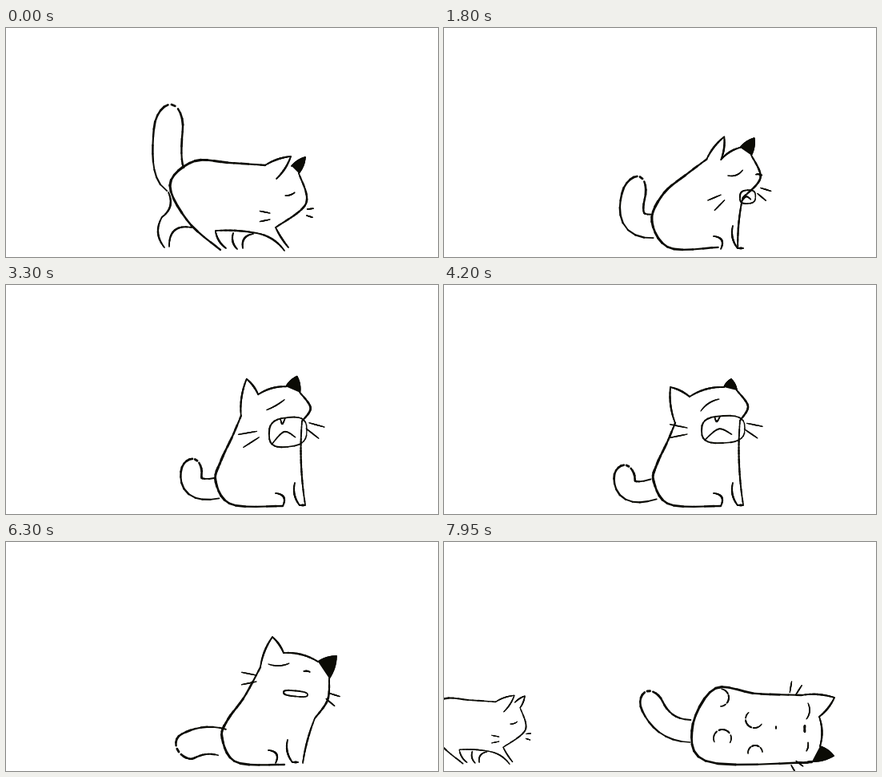
Animation of 540 by 287 pixels, one loop 8 s. Source, as an HTML page with a canvas:

```html
<!DOCTYPE html>
<html lang="en">
<head>
<meta charset="utf-8">
<title>Sleepy cat</title>
<style>
html, body { margin: 0; width: 100%; height: 100%; overflow: hidden; background: #fff; }
canvas { display: block; }
</style>
</head>
<body>
<canvas id="stage" width="540" height="287"></canvas>
<script>
const ctx = document.getElementById('stage').getContext('2d');
const LOOP = 8000, STEP = 150, N = 28;

// A pose is a set of joints; the rig below turns any blend of poses into lines.
// tail: root, bend, tip, radius; ears: base, tip, base; eye: ends, bend;
// mouth: centre, radii, tilt; whiskers: root, angle, length; mode: walking, lying, height
const walk = {
  tail: [211, 189, 194, 178, 207, 96, 18], back: [280, 169, 235, 167], seat: [205, 196, 228, 243, 268, 278],
  earL: [324, 172, 356, 161, 338, 189], earR: [357, 173, 374, 162, 366, 182],
  face: [375, 220, 337, 250], foot: [353, 275], eye: [349, 210, 361, 206, 0.1],
  mouth: [372, 234, 0, 0, 0], left: [330, 236, 3.14, 13], right: [376, 231, 0.1, 8],
  paw: [0], mode: [1, 0, 1]
};
const crouch = {
  tail: [258, 244, 216, 243, 249, 164, 16], back: [318, 181, 278, 199], seat: [258, 238, 282, 276, 340, 273],
  earL: [354, 168, 383, 155, 368, 188], earR: [386, 168, 405, 158, 397, 178],
  face: [407, 214, 376, 246], foot: [362, 277], eye: [376, 208, 392, 205, 0.2],
  mouth: [400, 232, 0, 0, 0], left: [371, 231, 2.5, 13], right: [407, 226, 0.5, 9],
  paw: [0], mode: [0, 0, 1]
};
const sit = { ...crouch, seat: [262, 246, 282, 275, 346, 277], foot: [374, 275] };
const yawn = {
  ...sit, tail: [265, 254, 220, 260, 240, 215, 13], back: [285, 186, 270, 218],
  earL: [296, 160, 309, 113, 319, 136], earR: [350, 127, 366, 113, 368, 136],
  face: [381, 155, 370, 171], eye: [328, 156, 350, 144, 0.1],
  mouth: [354, 186, 22, 19, -0.12], left: [320, 189, 2.6, 24], right: [377, 176, 0.5, 20]
};
const wail = {
  ...sit, tail: [262, 256, 216, 270, 228, 226, 13], back: [279, 197, 266, 225],
  earL: [289, 173, 283, 128, 307, 140], earR: [350, 128, 359, 118, 366, 132],
  face: [380, 152, 370, 170], eye: [321, 158, 344, 143, -0.1],
  mouth: [349, 181, 27, 17, -0.05], left: [304, 183, 3.14, 22], right: [377, 177, 0.4, 20]
};
const sulk = {
  ...sit, tail: [261, 255, 216, 264, 223, 236, 14], back: [284, 192, 268, 225],
  earL: [297, 172, 300, 125, 321, 143], earR: [366, 142, 387, 130, 381, 154],
  face: [393, 180, 378, 212], eye: [320, 167, 347, 156, 0],
  mouth: [358, 193, 28, 7, -0.1], left: [299, 191, 3.14, 21], right: [391, 190, 0, 13]
};
const doze = {
  ...sit, tail: [270, 251, 243, 243, 216, 263, 17], back: [298, 194, 277, 223],
  seat: [270, 245, 288, 276, 348, 279], foot: [371, 277], paw: [-9],
  earL: [318, 157, 333, 119, 347, 139], earR: [390, 150, 413, 143, 404, 171],
  face: [402, 198, 386, 221], eye: [328, 153, 354, 152, 0.1],
  mouth: [362, 190, 15, 3.5, 0.1], left: [313, 171, 3.14, 19], right: [402, 193, 0.5, 14]
};
const stretch = { ...doze, mode: [0, 0, 1.06] };
const flop = {
  tail: [308, 237, 266, 236, 254, 187, 14], back: [390, 190, 338, 184], seat: [310, 235, 332, 276, 460, 276],
  earL: [447, 192, 488, 195, 469, 219], earR: [470, 256, 487, 268, 460, 275],
  face: [455, 276, 450, 277], foot: [440, 277], eye: [455, 202, 453, 222, -0.15],
  mouth: [451, 234, 0.5, 4, 0], left: [436, 190, 5.08, 14], right: [437, 277, 0.85, 11],
  paw: [0], mode: [0, 1, 1]
};
const flick = { ...flop, tail: [308, 237, 266, 230, 274, 143, 14] };

const keys = [
  [0, walk], [1050, crouch], [1200, crouch], [2500, yawn], [2850, yawn],
  [4050, wail], [4350, wail], [5150, sulk], [5400, sulk], [6200, doze],
  [6400, doze], [6600, stretch], [7300, flop], [7500, flick], [7900, flop], [LOOP, flop]
];

// Limbs as arcs: start, end, bend
const walkLegs = [
  [203, 206, 195, 237, -0.2], [195, 237, 198, 275, 0.17], [232, 250, 204, 274, 0.3],
  [262, 255, 275, 276, 0.1], [284, 257, 289, 277, 0.15], [309, 258, 296, 276, 0.25],
  [313, 257, 348, 279, -0.1]
];
const sitLegs = [[361, 248, 367, 276, 0.12], [367, 276, 374, 276, 0], [337, 261, 346, 277, -0.35]];
// Raised paws: centre, radius, angles
const pads = [[345, 195, 11, -1.4, 1.5], [388, 222, 11, 0.6, 4], [348, 246, 11, 2.7, 6.8], [389, 264, 9, 3, 6.2]];

const plot = f => Array.from({ length: N + 1 }, (_, i) => f(i / N));
const quad = (a, b, c, u) => (1 - u) * (1 - u) * a + 2 * u * (1 - u) * b + u * u * c;
const blend = (a, b, m) => Object.fromEntries(
  Object.keys(a).map(k => [k, a[k].map((v, i) => v + (b[k][i] - v) * m)]));

function arc(x1, y1, x2, y2, bend) {
  const cx = (x1 + x2) / 2 - 2 * bend * (y2 - y1), cy = (y1 + y2) / 2 + 2 * bend * (x2 - x1);
  return plot(u => [quad(x1, cx, x2, u), quad(y1, cy, y2, u)]);
}

// Catmull-Rom curve through a flat list of x, y
function curve(...p) {
  const last = p.length / 2 - 1;
  return plot(s => {
    const i = Math.min(last - 1, Math.floor(s * last)), u = s * last - i;
    return [0, 1].map(d => {
      const [a, b, c, e] = [-1, 0, 1, 2].map(j => p[2 * Math.max(0, Math.min(last, i + j)) + d]);
      return b + u * (c - a + u * (2 * a - 5 * b + 4 * c - e + u * (3 * (b - c) + e - a))) / 2;
    });
  });
}

// Brush line: thin at the ends, thicker in the middle
function brush(p, w = 2.3, gap = () => false) {
  for (let i = 0; i < N; i++) {
    if (gap(i)) continue;
    ctx.lineWidth = w * (0.7 + 0.3 * Math.sin(Math.PI * i / N) + 0.1 * Math.sin(i * 1.9 + w * 9));
    ctx.beginPath();
    ctx.moveTo(...p[i]);
    ctx.lineTo(...p[i + 1]);
    ctx.stroke();
  }
}

// Tube around a bent spine with a ragged round tip
function drawTail([x1, y1, cx, cy, x2, y2, r]) {
  const line = plot(s => {
    const side = s < 0.5 ? 1 : -1, u = Math.sin(Math.PI * s);
    const dx = (1 - u) * (cx - x1) + u * (x2 - cx), dy = (1 - u) * (cy - y1) + u * (y2 - cy);
    const w = side * r * Math.sqrt(1 - Math.max(0, (u - 0.8) / 0.2) ** 2) / Math.hypot(dx, dy);
    return [quad(x1, cx, x2, u) + dy * w, quad(y1, cy, y2, u) - dx * w];
  });
  brush(line, 2.7, i => i === 13 || i === 15);
}

function drawEar([x1, y1, x, y, x2, y2], filled) {
  const a = arc(x1, y1, x, y, -0.06), b = arc(x, y, x2, y2, -0.06);
  brush(a);
  brush(b);
  if (!filled) return;
  ctx.beginPath();
  [...a, ...b].forEach(q => ctx.lineTo(...q));
  ctx.fill();
}

function drawWhiskers([x, y, angle, len]) {
  for (const s of [-1, 1]) {
    const px = x - Math.sin(angle) * s * 4, py = y + Math.cos(angle) * s * 4, a = angle + s * 0.2;
    brush(arc(px, py, px + len * Math.cos(a), py + len * Math.sin(a), 0), 1.6);
  }
}

function drawMouth([x, y, rx, ry, tilt]) {
  const at = (u, v) => [x + u * rx, y + v * ry + u * rx * tilt];
  const soft = v => Math.sign(v) * Math.abs(v) ** 0.7;
  if (ry > 1) brush(plot(s => at(soft(Math.cos(s * 2 * Math.PI)), soft(Math.sin(s * 2 * Math.PI)))), 2);
  if (ry > 5) brush(curve(...at(-0.85, 0.7), ...at(-0.2, -0.05), ...at(0.4, 0.4)), 1.8);
  if (ry > 10) brush(curve(...at(-0.4, -0.95), ...at(-0.3, -0.6), ...at(-0.15, -0.95)), 1.8);
}

function draw(c, swing, filled = true) {
  const [walking, lying, height] = c.mode, [mx, my, , open] = c.mouth;
  ctx.save();
  ctx.translate(0, 280 * (1 - height));
  ctx.scale(1, height);
  drawTail(c.tail);
  brush(curve(...c.earL.slice(0, 2), ...c.back, ...c.seat), 3);
  drawEar(c.earL);
  drawEar(c.earR, filled);
  brush(curve(...c.earR.slice(4), ...c.face), 2.5);
  brush(arc(...c.face.slice(2), ...c.foot, 0.03));
  brush(arc(...c.eye), 1.7);
  drawMouth(c.mouth);
  drawWhiskers(c.left);
  drawWhiskers(c.right);
  if (open > 3) brush(arc(...c.earL.slice(4), ...c.earR.slice(0, 2), -0.08));

  if (walking > 0.05) {
    const x = v => v + 50 * (1 - walking), y = v => 278 + (v - 278) * walking;
    walkLegs.forEach(([x1, y1, x2, y2, b], i) =>
      brush(arc(x(x1), y(y1), x(x2) + (i % 2 ? swing : -swing), y(y2), b)));
    brush(arc(x(262), y(254), x(313), y(257), -0.03));
  } else if (lying > 0.8) {
    for (const [px, py, r, a, b] of pads)
      brush(plot(u => [px + r * Math.cos(a + u * (b - a)), py + r * Math.sin(a + u * (b - a))]), 2, i => i % 11 > 8);
    brush(arc(455, 251, 453, 262, -0.1), 1.7);
    brush(arc(415, 231, 415, 234, 0), 1.4);
  } else if (lying < 0.2) {
    sitLegs.forEach(([x1, y1, x2, y2, b]) => brush(arc(x1 + c.paw[0], y1, x2 + c.paw[0], y2, b)));
    if (open > 2 && open < 10) brush(arc(mx + 10, my - 28, mx + 18, my - 27, -0.1), 1.8);
  }
  ctx.restore();
}

function frame(now) {
  const t = Math.floor(now % LOOP / STEP) * STEP;
  const i = keys.findIndex(k => k[0] > t) - 1;
  const [t0, a] = keys[i], [t1, b] = keys[i + 1];
  const u = (t - t0) / (t1 - t0);
  ctx.fillStyle = '#fff';
  ctx.fillRect(0, 0, 540, 287);
  ctx.fillStyle = ctx.strokeStyle = '#0b0b05';
  ctx.lineCap = ctx.lineJoin = 'round';
  draw(blend(a, b, u * u * (3 - 2 * u)), 7 * Math.sin(t / 110));

  // A smaller cat walks in from the left
  const left = 7950 - t;
  if (left < 700) {
    ctx.save();
    ctx.translate(-172 - left * 0.15, 277 * 0.27);
    ctx.scale(0.73, 0.73);
    draw(walk, -7 * Math.sin(left / 110), false);
    ctx.restore();
  }
  requestAnimationFrame(frame);
}
requestAnimationFrame(frame);
</script>
</body>
</html>
```
